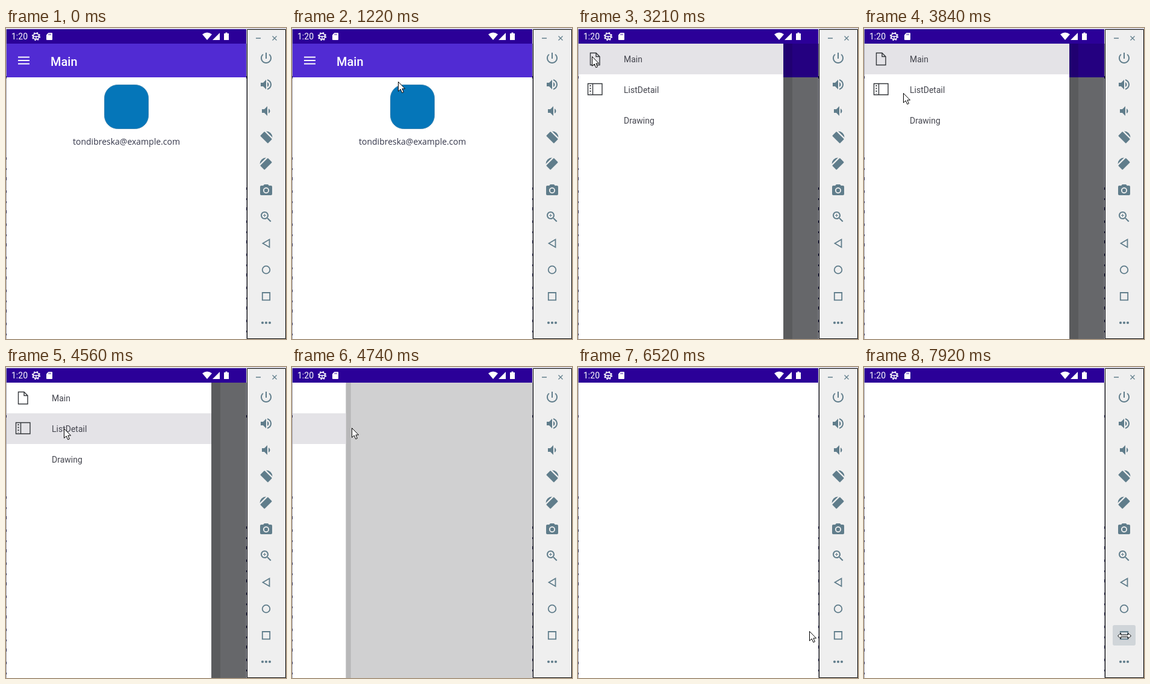
Animation, 465 px wide and 517 px high, one loop 8 s. Source, as an HTML page:

```html
<!DOCTYPE html>
<html lang="en">
<head>
<meta charset="utf-8">
<title>App drawer demo</title>
<style>
  html, body { margin: 0; height: 100%; overflow: hidden; background: #fff; }
  svg { display: block; width: 100vw; height: 100vh; }
  text { font-family: Roboto, sans-serif; font-size: 14px; }
  .outline { fill: none; stroke: #33363a; }
  .tools { fill: #607d8b; }
  .tools .line { fill: none; stroke: #607d8b; stroke-width: 2; }
</style>
</head>
<body>
<svg viewBox="0 0 465 517">
  <defs>
    <clipPath id="screen"><path d="M1 26H399V517H1z"/></clipPath>
    <g id="rotate">
      <rect class="line" x="-9" y="-5" width="18" height="10" rx="1" transform="rotate(45)"/>
      <path class="line" style="stroke-width:1.6" d="M0-10.5A10.5 10.5 0 0 1 10.5 0M0-10.5L4-7"/>
    </g>
  </defs>

  <!-- window edges -->
  <path fill="#dcdce8" d="M0 0H465V2H0z"/>
  <path fill="none" stroke="#a4a4b0" d="M.5 2V517M399.5 26V517"/>
  <path fill="none" stroke="#23234a" stroke-dasharray="4 14 3 12 5 17"
        d="M.5 215V517M399.5 265V517M399.5 80V96M.5 80V96"/>

  <g clip-path="url(#screen)">
    <g id="mainPage">
      <rect id="avatar" x="163.5" y="94.5" width="73" height="73" rx="22"/>
      <text x="200" y="194" text-anchor="middle" fill="#34364a"
            style="font-family:'Open Sans',sans-serif">tondibreska@example.com</text>
    </g>
    <path id="scrim" fill="#000208" d="M1 26H399V517H1z"/>
    <g id="header">
      <path id="headerBar" d="M1 26H399V82H1z"/>
      <path stroke="#fff" stroke-width="2" d="M20 48.5H39M20 54H39M20 59.5H39"/>
      <text x="74" y="62.5" fill="#fff" style="font-size:20px;font-weight:500">Main</text>
    </g>
    <rect id="shadow" y="26" height="491"/>
    <g id="drawer">
      <path fill="#fff" d="M-40 26H341V517H-40z"/>
      <rect id="selected" x="0" width="341" height="51" fill="#e4e3e7"/>
      <path class="outline" stroke-width="1.4" d="M20.5 41.5H30L36 47.5V61.5H20.5zM30 41.5V47.5H36"/>
      <path class="outline" stroke-width="1.4" d="M16.5 92.5H40V111H16.5zM24.5 92.5V111"/>
      <path class="outline" stroke-width="2" stroke-dasharray="2 2.5" d="M20.5 95V109"/>
      <g fill="#45464f">
        <text x="76" y="57">Main</text>
        <text x="76" y="107.5">ListDetail</text>
        <text x="76" y="158.5">Drawing</text>
      </g>
    </g>
  </g>

  <!-- status bar -->
  <path fill="#2b0098" d="M1 2H399V26H1z"/>
  <g fill="#fff">
    <text x="9" y="19">1:20</text>
    <g fill="none" stroke="#fff">
      <circle cx="50" cy="14" r="4.9" stroke-width="1.6"/>
      <circle cx="50" cy="14" r="6.3" stroke-width="1.6" stroke-dasharray="2.5 2.45"/>
      <path stroke-width="1.4" d="M45 14H55M50 14V19"/>
    </g>
    <path d="M70.5 8H76Q77 8 77 9V19Q77 20 76 20H68Q67 20 67 19V11.5z"/>
    <path stroke="#2b0098" d="M71.5 9.5V12M74 9.5V12"/>
    <path d="M326 10.5Q334 4.5 342 10.5L334 20z"/>
    <path d="M343 20L355 8V20z"/>
    <path d="M364.5 7.5H367.5V9H370V20H362V9H364.5z"/>
  </g>

  <!-- emulator toolbar -->
  <path fill="#efefef" stroke="#000" d="M400.5 2.5H464.5V516.5H400.5z"/>
  <rect id="hover" x="413" y="429" width="38" height="34" rx="3" fill="#d0d5d9"/>
  <g class="tools">
    <path class="line" style="stroke-width:1.3" d="M415 17H423M442.5 13.5L449.5 20.5M449.5 13.5L442.5 20.5"/>
    <path transform="translate(420 38)" d="M13 3h-2v10h2V3zm4.83 2.17l-1.42 1.42C17.99 7.86 19 9.81 19 12c0 3.87-3.13 7-7 7s-7-3.13-7-7c0-2.19 1.01-4.14 2.58-5.42L6.17 5.17C4.23 6.82 3 9.26 3 12c0 4.97 4.03 9 9 9s9-4.03 9-9c0-2.74-1.23-5.18-3.17-6.83z"/>
    <path transform="translate(420 82)" d="M3 9v6h4l5 5V4L7 9H3zm13.5 3c0-1.77-1.02-3.29-2.5-4.03v8.05c1.48-.73 2.5-2.25 2.5-4.02zM14 3.23v2.06c2.89.86 5 3.54 5 6.71s-2.11 5.85-5 6.71v2.06c4.01-.91 7-4.49 7-8.77s-2.99-7.86-7-8.77z"/>
    <path transform="translate(420 126)" d="M18.5 12c0-1.77-1.02-3.29-2.5-4.03v8.05c1.48-.73 2.5-2.25 2.5-4.02zM5 9v6h4l5 5V4L9 9H5z"/>
    <use href="#rotate" transform="translate(432 182)"/>
    <use href="#rotate" transform="translate(432 226) scale(-1 1)"/>
    <g transform="translate(420 258)">
      <circle cx="12" cy="12" r="3.2"/>
      <path d="M9 2L7.17 4H4c-1.1 0-2 .9-2 2v12c0 1.1.9 2 2 2h16c1.1 0 2-.9 2-2V6c0-1.1-.9-2-2-2h-3.17L15 2H9zm3 15c-2.76 0-5-2.24-5-5s2.24-5 5-5 5 2.24 5 5-2.24 5-5 5z"/>
    </g>
    <path transform="translate(420 302)" d="M15.5 14h-.79l-.28-.27C15.41 12.59 16 11.11 16 9.5 16 5.91 13.09 3 9.5 3S3 5.91 3 9.5 5.91 16 9.5 16c1.61 0 3.09-.59 4.23-1.57l.27.28v.79l5 4.99L20.49 19l-4.99-5zm-6 0C7.01 14 5 11.99 5 9.5S7.01 5 9.5 5 14 7.01 14 9.5 11.99 14 9.5 14zM12 10h-2v2H9v-2H7V9h2V7h1v2h2v1z"/>
    <path class="line" style="stroke-width:1.8" d="M426.5 358L437.5 351.5V364.5z"/>
    <circle class="line" style="stroke-width:1.8" cx="432" cy="402" r="6.3"/>
    <path class="line" style="stroke-width:1.8" d="M425.8 440H438.2V452.4H425.8z"/>
    <circle cx="426" cy="490" r="2.1"/><circle cx="432" cy="490" r="2.1"/><circle cx="438" cy="490" r="2.1"/>
  </g>

  <g fill="#fff" stroke="#000" stroke-width="1">
    <path id="arrow" d="M.5.5V16.2L4.2 12.8 6.8 18.7 9.4 17.6 6.9 11.9H11.6z"/>
    <path id="resize" d="M-11 0L-6-4.5V-1.5H6V-4.5L11 0 6 4.5V1.5H-6V4.5z"/>
  </g>
</svg>

<script>
const LOOP = 8000, DRAWER = 341;
const el = id => document.getElementById(id);
const clamp = v => Math.min(1, Math.max(0, v));
const progress = (t, start, end) => clamp((t - start) / (end - start));
const smooth = u => u * u * (3 - 2 * u);
const mix = (a, b, u) => a + (b - a) * u;
const show = (id, on) => el(id).setAttribute('visibility', on ? 'visible' : 'hidden');
const move = (id, x, y) => el(id).setAttribute('transform', `translate(${x} ${y})`);

// [time, x, y] stops of the pointer
const stops = [
  [220, 384, 510], [1020, 134, 132], [1040, 134, 132], [1830, 138, 110],
  [1850, 138, 110], [2090, 20, 38], [2230, 20, 38], [2400, 23, 47],
  [3200, 23, 47], [3840, 65, 108], [4000, 65, 108], [4700, 99, 101],
  [5650, 99, 101], [6390, 380, 429], [6460, 380, 429], [6520, 384, 439],
  [7090, 425, 444], [LOOP, 425, 444]
];

function pointer(t) {
  if (t > 1040 && t < 1830) {            // one turn around the avatar
    const angle = Math.PI - .17 + 6.88 * progress(t, 1040, 1830);
    return [185 + 52 * Math.cos(angle), 125.5 + 36.5 * Math.sin(angle)];
  }
  const next = Math.max(1, stops.findIndex(s => s[0] > t));
  const [t0, x0, y0] = stops[next - 1], [t1, x1, y1] = stops[next];
  const u = smooth(progress(t, t0, t1));
  return [mix(x0, x1, u), mix(y0, y1, u)];
}

// Fraction of the drawer on screen; some positions are held for a moment.
function drawerOpen(t) {
  for (const [from, to] of [[2850, 2950], [4740, 4840]])
    if (t >= from && t < to) t = from;
  const remaining = start => (1 - progress(t, start, start + 400)) ** 5;
  return t < 4646 ? 1 - remaining(2840.5) : remaining(4646);
}

function draw(t) {
  const open = drawerOpen(t), edge = open * DRAWER;
  const onMain = t < 4300, resizing = t >= 7070;

  show('mainPage', onMain);
  show('header', onMain);
  const loading = t >= 2800;
  el('avatar').setAttribute('fill', loading ? '#d0d5d9' : '#0576b9');
  el('avatar').setAttribute('stroke', loading ? '#6b7780' : '#3f86b2');
  el('headerBar').setAttribute('fill',
    `rgb(${mix(81, 36, open)},${mix(43, 0, open)},${mix(211, 128, open)})`);
  el('scrim').setAttribute('opacity', open < .15 && onMain ? 0 : .6 * open ** .88);

  move('drawer', edge - DRAWER, 0);
  el('selected').setAttribute('y', t < 4150 ? 26 : 77);
  el('shadow').setAttribute('x', edge);
  el('shadow').setAttribute('width', 6 + 9 * open);
  el('shadow').setAttribute('opacity', Math.min(.12, open * .45));

  show('hover', t >= 7870);
  show('arrow', t >= 220 && !resizing);
  show('resize', resizing);
  move('arrow', ...pointer(t).map(Math.round));
  move('resize', 425.5 + Math.round(7 * smooth(progress(t, 7270, 7430))), 447);
}

function tick() {
  draw(performance.now() % LOOP);
  requestAnimationFrame(tick);
}
tick();
</script>
</body>
</html>
```
